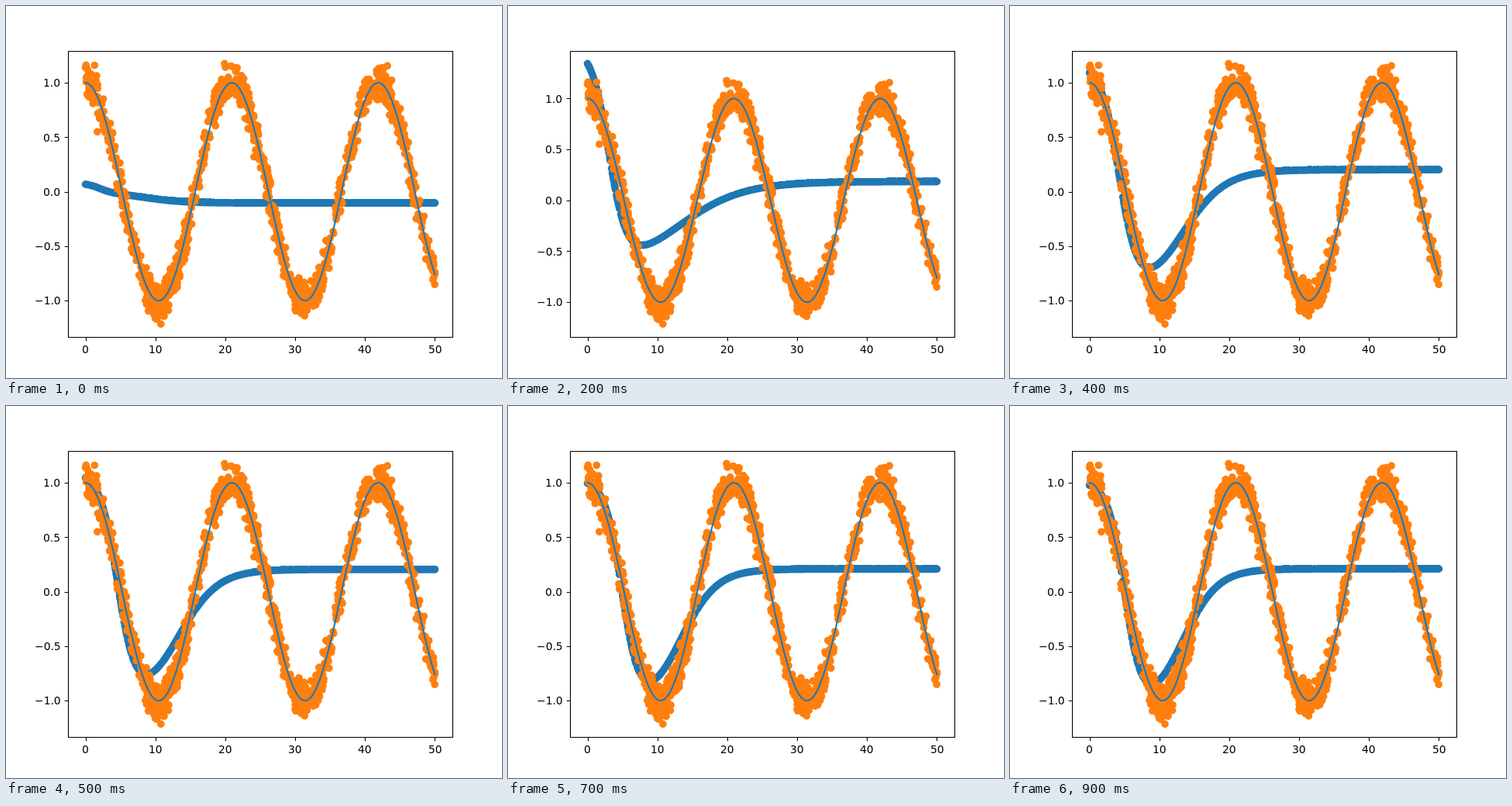
Write an HTML page with a canvas that moves like this. It is 640x480 px and loops after 1 s.

```html
<!DOCTYPE html>
<html lang="en">
<head>
<meta charset="utf-8">
<title>Curve fitting</title>
<style>
  html, body { margin: 0; width: 100%; height: 100%; overflow: hidden; background: #fff; }
  canvas { display: block; width: 640px; height: 480px; }
</style>
</head>
<body>
<canvas id="plot" width="640" height="480"></canvas>
<script>
const ctx = document.getElementById('plot').getContext('2d');
const BLUE = '#1f77b4', ORANGE = '#ff7f0e';
const BOX = { left: 80, right: 576, top: 57.6, bottom: 427.2 };
const STEP = 100, STEPS = 10, DOT = 4.86, TICK = 4.86;
const LOW = -1.215, HIGH = 1.175, COUNT = 1000;

// The model is a level plus a falling and a recovering sigmoid.
// Each pose: level, drop size, place and width, dip size, place and width.
const warmUp = [
  [-.104, .075, 2, .85, -.11, 8, 3],
  [.078, .98, 2.4, 1.32, .21, 16.3, 4.9],
  [.184, 2.2, 3.06, 1.27, .92, 12.6, 4.7],
  [.196, 2.17, 3.72, 1.4, 1.1, 13.1, 3.5]
];
const settled = [.21, 2.12, 5.1, 1.2, 1.34, 13.35, 2.43];

const truth = x => Math.cos(.3 * x);
const px = x => 102.545 + x * 9.0182;
const snap = v => Math.floor(v + .5) + .5;
const sigmoid = (x, mid, width) => 1 / (1 + Math.exp((x - mid) / width));

function pose(step) {
  const last = warmUp.length - 1;
  if (step <= last) return warmUp[step];
  const t = 1 - Math.exp(-.51 * (step - last));
  return warmUp[last].map((v, i) => v + (settled[i] - v) * t);
}

function model(step) {
  const [level, drop, dropAt, dropWidth, dip, dipAt, dipWidth] = pose(step);
  return x => level + drop * sigmoid(x, dropAt, dropWidth) - dip * sigmoid(x, dipAt, dipWidth);
}

function yScale(high) {
  const k = 336 / (high - LOW);
  return y => 74.4 + (high - y) * k;
}

function randomizer(seed) {
  return () => {
    seed = (seed + 0x6d2b79f5) | 0;
    let t = Math.imul(seed ^ (seed >>> 15), seed | 1);
    t ^= t + Math.imul(t ^ (t >>> 7), t | 61);
    return ((t ^ (t >>> 14)) >>> 0) / 4294967296;
  };
}

// Noisy samples of the wave, with a few conspicuous strays.
function makeSamples() {
  const rnd = randomizer(42);
  const list = [[0, 1.14], [1.3, 1.16], [1.7, .55], [10.8, -1.215], [19.9, 1.175], [24.1, .32], [43.2, 1.155], [50, -.74]];
  while (list.length < COUNT) {
    const x = 50 * rnd();
    const noise = .1 * Math.sqrt(-2 * Math.log(1 - rnd())) * Math.cos(2 * Math.PI * rnd());
    if (Math.abs(noise) < .19) list.push([x, truth(x) + noise]);
  }
  return list;
}

function dots(points, py, color) {
  ctx.fillStyle = color;
  ctx.beginPath();
  for (const [x, y] of points) {
    const cx = px(x), cy = py(y);
    ctx.moveTo(cx + DOT, cy);
    ctx.arc(cx, cy, DOT, 0, 2 * Math.PI);
  }
  ctx.fill();
}

function wave(py) {
  ctx.strokeStyle = BLUE;
  ctx.lineWidth = 2.08;
  ctx.lineJoin = 'round';
  ctx.lineCap = 'square';
  ctx.beginPath();
  for (let i = 0; i <= 500; i++) ctx.lineTo(px(i / 10), py(truth(i / 10)));
  ctx.stroke();
}

// Text starts on a whole pixel; align is the share of its width left of x.
function label(text, x, y, align) {
  ctx.fillText(text, Math.round(x - ctx.measureText(text).width * align), Math.round(y));
}

function axes(py) {
  const l = snap(BOX.left), r = snap(BOX.right), t = snap(BOX.top), b = snap(BOX.bottom);
  ctx.strokeStyle = ctx.fillStyle = '#000';
  ctx.lineWidth = 1.11;
  ctx.lineCap = 'butt';
  ctx.lineJoin = 'miter';
  ctx.font = '13.89px "DejaVu Sans", sans-serif';
  ctx.beginPath();
  ctx.rect(l, t, r - l, b - t);
  for (let x = 0; x <= 50; x += 10) {
    ctx.moveTo(snap(px(x)), b);
    ctx.lineTo(snap(px(x)), b + TICK);
    label(String(x), px(x), 448, .5);
  }
  for (let y = -1; y <= 1; y += .5) {
    const cy = snap(py(y));
    ctx.moveTo(l, cy);
    ctx.lineTo(l - TICK, cy);
    label(y.toFixed(1).replace('-', '\u2212'), 70.3, py(y) + 5.3, 1);
  }
  ctx.stroke();
}

const samples = makeSamples();

function draw(step) {
  const fit = model(step);
  const py = yScale(Math.max(HIGH, fit(0)));
  ctx.fillStyle = '#fff';
  ctx.fillRect(0, 0, 640, 480);
  dots(samples.map(([x]) => [x, fit(x)]), py, BLUE);
  dots(samples, py, ORANGE);
  wave(py);
  axes(py);
}

const start = performance.now();
let shown = -1;

function tick() {
  const step = Math.floor((performance.now() - start) / STEP) % STEPS;
  if (step !== shown) draw(shown = step);
  requestAnimationFrame(tick);
}
tick();
</script>
</body>
</html>
```
